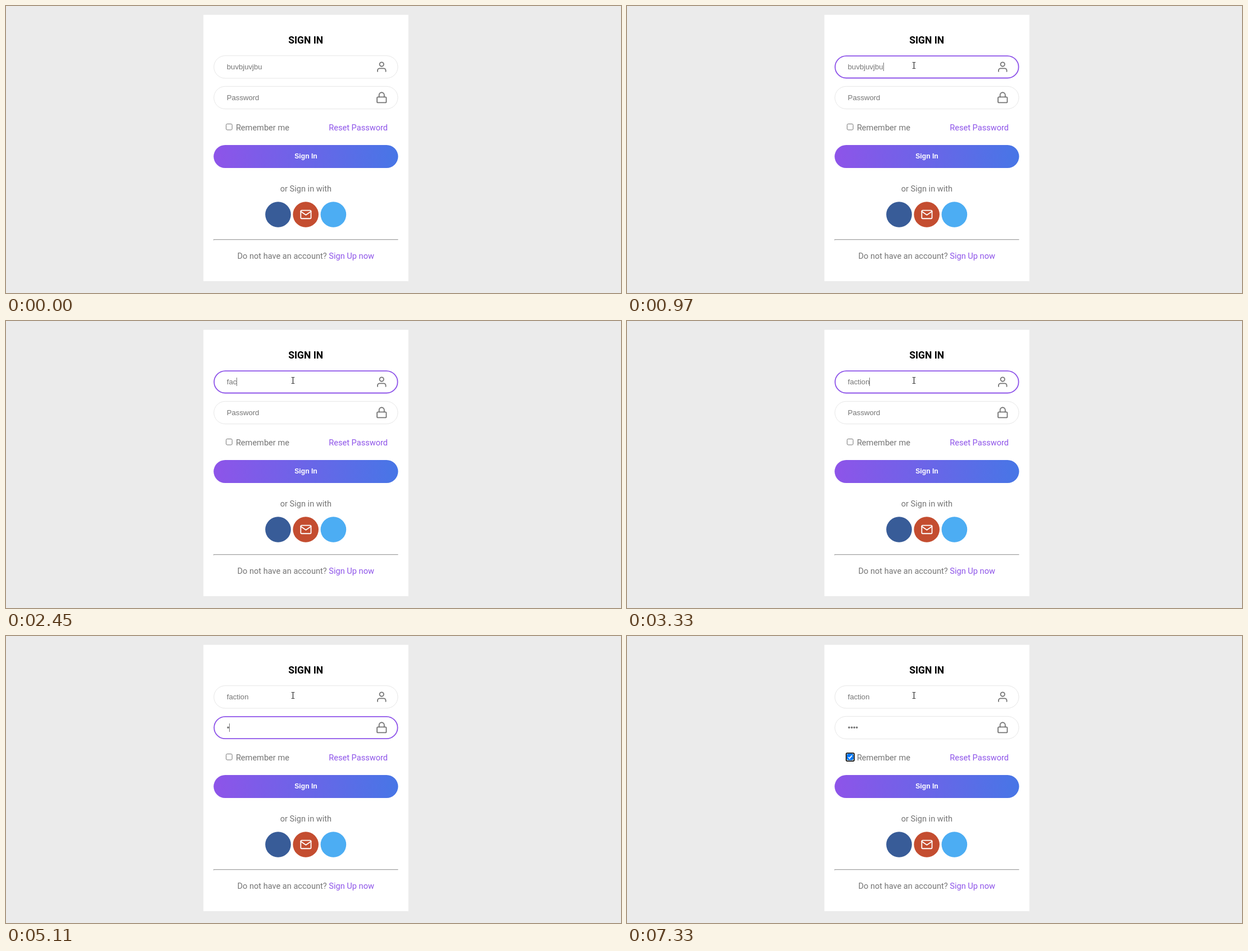
These frames come from a looping animation (1094x512 px, 8000 ms). An HTML page:

```html
<!DOCTYPE html>
<html lang="en">
<head>
<meta charset="utf-8">
<title>Sign in</title>
<style>
  html, body { margin: 0; width: 100%; height: 100%; overflow: hidden; background: #ebebeb; }
  svg { display: block; width: 1094px; height: 512px; }
  text { font: 14.59px Roboto, sans-serif; fill: #757575; white-space: pre; }
  .title { font-size: 17.5px; font-weight: 700; fill: #000; }
  .link { fill: #8e54e9; }
  .field { font: 13.13px "Liberation Sans", Arial, sans-serif; }
  .button { font: bold 12.15px "Liberation Sans", Arial, sans-serif; fill: #fff; }
  .mid { text-anchor: middle; }
  .box { fill: #fff; stroke: #e5e5e5; stroke-width: .95; }
  .box.focus { stroke: #8e54e9; stroke-width: 1.82; }
  .icon { fill: none; stroke: #757575; stroke-width: 2; stroke-linecap: round; stroke-linejoin: round; }
</style>
</head>
<body>
<svg viewBox="0 0 1094 512">
  <defs>
    <linearGradient id="fade"><stop stop-color="#8e54e9"/><stop offset="1" stop-color="#4776e6"/></linearGradient>
  </defs>
  <rect x="351.2" y="15.8" width="364.6" height="475" fill="#fff"/>
  <text class="title mid" x="533.2" y="67.2">SIGN IN</text>

  <rect class="box" id="userBox"/>
  <rect class="box" id="passBox"/>
  <rect id="mark" x="393" y="101" height="15.6" fill="#3390ff"/>
  <text class="field" id="user" x="392.8" y="113"></text>
  <path id="wave" fill="none" stroke="#e0202c" stroke-width="1.3"/>
  <text class="field" id="pass" x="392.8" y="168"></text>
  <rect id="caret" width="1" height="15" fill="#757575"/>
  <g class="icon" transform="translate(657.3 97.7) scale(.9117)">
    <path d="M20 21v-2a4 4 0 0 0-4-4H8a4 4 0 0 0-4 4v2"/><circle cx="12" cy="7" r="4"/>
  </g>
  <g class="icon" transform="translate(657.3 152.4) scale(.9117)">
    <rect x="3" y="11" width="18" height="11" rx="2"/><path d="M7 11V7a5 5 0 0 1 10 0v4"/>
  </g>

  <rect id="ring" x="389.9" y="208.9" width="14.2" height="14.2" rx="2" fill="#fff" stroke="#101010" stroke-width="1.8"/>
  <rect id="check" x="391.6" y="210.4" width="10.6" height="10.6" rx="2" fill="#fff" stroke="#767676"/>
  <path id="tick" d="M393.7 216l2.2 2.3 4.3-5.2" fill="none" stroke="#fff" stroke-width="1.8"/>
  <text x="408.9" y="221.8">Remember me</text>
  <text class="link" x="679" y="221.8" text-anchor="end">Reset Password</text>

  <rect x="369.3" y="248" width="328.2" height="41" rx="20.5" fill="url(#fade)"/>
  <text class="button mid" x="533.5" y="272">Sign In</text>

  <text class="mid" x="533.4" y="331.2">or Sign in with</text>
  <circle cx="484" cy="372" r="22.8" fill="#385c98"/>
  <circle cx="533.2" cy="372" r="22.8" fill="#c44d30"/>
  <circle cx="582.4" cy="372" r="22.8" fill="#4cadf3"/>
  <g class="icon" transform="translate(522.5 361) scale(.9117)" style="stroke:#fff">
    <rect x="2" y="4" width="20" height="16" rx="2"/><path d="M22 6l-10 7L2 6"/>
  </g>

  <path d="M369.4 418v-1.5H697.5" fill="none" stroke="#a3a3a3"/>
  <path d="M370 417.5H697.5" stroke="#e4e4e4"/>
  <text class="mid" x="533.2" y="451">Do not have an account? <tspan class="link">Sign Up now</tspan></text>

  <path id="arrow" d="M0 0V14.6L3.4 11.4 5.6 16.4 7.8 15.4 5.7 10.6H10.4Z" fill="#fff" stroke="#000" stroke-width=".9"/>
  <path id="beam" d="M-2.5 -5.5H-.8L0 -5 .8 -5.5H2.5M0 -5V5M-2.5 5.5H-.8L0 5 .8 5.5H2.5" fill="none" stroke="#000"/>
</svg>
<script>
const LOOP = 8000;
const OLD = 'buvbjuvjbu', NAME = 'faction', HINT = 'Password';
const $ = id => document.getElementById(id);
const show = (id, on) => $(id).setAttribute('visibility', on ? 'visible' : 'hidden');
const set = (id, attrs) => { for (const k in attrs) $(id).setAttribute(k, attrs[k]); };

// time, changes from then on
const steps = [
  [0, { user: OLD, pass: HINT, focus: '', caret: false, marked: false, check: 'off' }],
  [970, { focus: 'user', caret: true }],
  [1110, { caret: false, marked: true }],
  [1770, { user: NAME.slice(0, 1), caret: true, marked: false }],
  [1850, { user: NAME.slice(0, 2) }],
  [2390, { caret: false }],
  [2450, { user: NAME.slice(0, 3), caret: true }],
  [2980, { user: NAME.slice(0, 4) }],
  [3190, { user: NAME.slice(0, 5) }],
  [3260, { user: NAME.slice(0, 6) }],
  [3330, { user: NAME }],
  [3860, { focus: 'pass' }],
  [4390, { caret: false }],
  [4910, { caret: true }],
  [5110, { pass: '•' }],
  [5390, { pass: '••' }],
  [5590, { pass: '•••' }],
  [5930, { pass: '••••' }],
  [6470, { caret: false }],
  [6590, { focus: 'check' }],
  [7200, { check: 'down' }],
  [7330, { check: 'on' }]
];

// time, pointer x, y
const pointer = [
  [310, 760, 318], [380, 704, 276], [440, 640, 228], [510, 585, 187],
  [570, 547, 157], [640, 520, 122], [710, 510.5, 106],
  [1110, 517, 100], [1210, 514, 103], [1310, 510.5, 106]
];

function placeBox(id, y, focus) {
  const inset = focus ? .9 : .5;
  set(id, {
    class: focus ? 'box focus' : 'box', x: 369.3 + inset, y: y + inset,
    width: 328.2 - 2 * inset, height: 41.2 - 2 * inset, rx: 20.6 - inset
  });
}

function drawPointer(t) {
  const now = pointer.filter(p => p[0] <= t).pop();
  const beam = now && now[2] < 184;
  show('arrow', now && !beam);
  show('beam', beam);
  if (now) set(beam ? 'beam' : 'arrow', { transform: `translate(${now[1]} ${now[2]})` });
}

function draw(t) {
  const s = Object.assign({}, ...steps.filter(row => row[0] <= t).map(row => row[1]));
  placeBox('userBox', 88.2, s.focus === 'user');
  placeBox('passBox', 142.9, s.focus === 'pass');
  $('user').textContent = s.user;
  $('pass').textContent = s.pass;
  $('user').style.fill = s.marked ? '#fff' : '';

  const typed = s.focus === 'pass' ? (s.pass === HINT ? 0 : $('pass').getComputedTextLength())
                                   : $('user').getComputedTextLength();
  show('caret', s.caret);
  set('caret', { x: Math.round(392.8 + typed), y: s.focus === 'pass' ? 156 : 101 });
  show('mark', s.marked);
  show('wave', s.marked);
  if (s.marked) {
    set('mark', { width: typed });
    set('wave', { d: 'M393 115.4' + 'l1.5 -1.1 1.5 1.1'.repeat(Math.floor(typed / 3)) });
  }

  const on = s.check === 'on';
  show('ring', s.focus === 'check');
  show('tick', on);
  set('check', {
    fill: on ? '#0075ff' : '#fff',
    stroke: on ? '#0075ff' : s.check === 'down' ? '#8d8d8d' : '#767676'
  });
  drawPointer(t);
}

const start = performance.now();
function tick(now) {
  draw(Math.max(0, now - start) % LOOP);
  requestAnimationFrame(tick);
}
draw(0);
requestAnimationFrame(tick);
</script>
</body>
</html>
```
